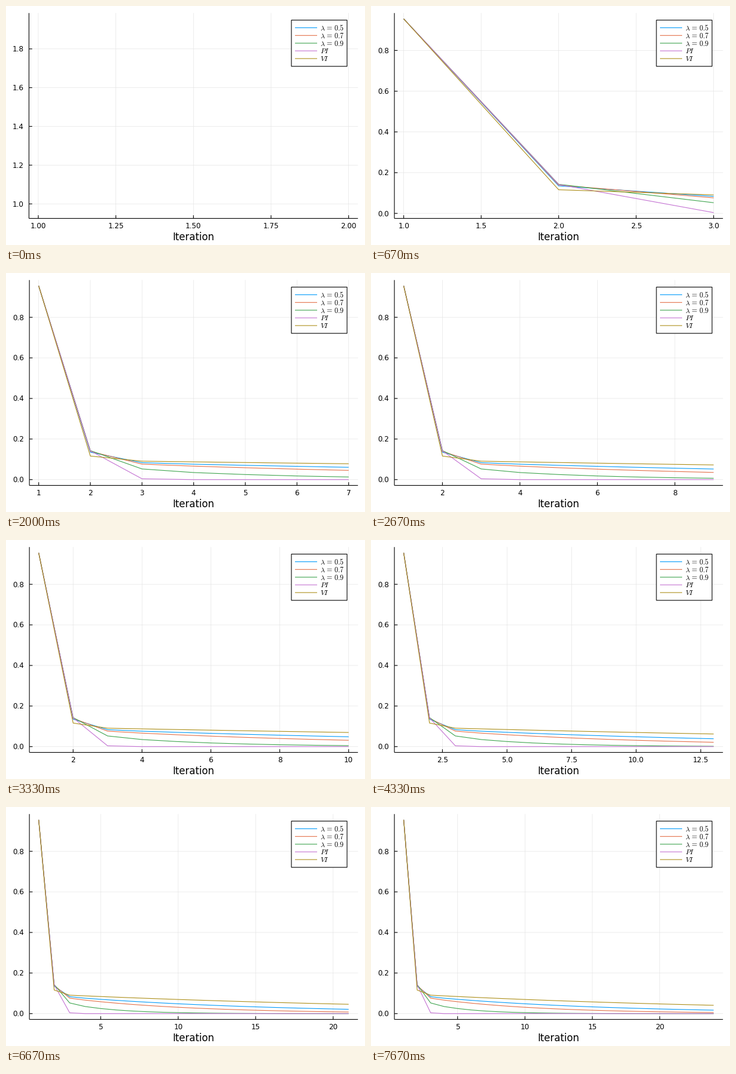
A matplotlib script that plays this animation: 600x400 px, repeating every 8000 ms.

```python
import math

import matplotlib.pyplot as plt
import numpy as np
from matplotlib.animation import FuncAnimation
from matplotlib.patches import Rectangle

W, H, DPI = 600, 400, 100
STEPS, LOOP_MS = 24, 8000
TOP, BOTTOM, RIGHT = 11.8, 355.5, 588.2
PAD = 0.03
PX = 72 / DPI  # points per pixel
TICK_SIZE, LABEL_SIZE, LEGEND_SIZE = 12 * PX, 16.5 * PX, 12 * PX
NICE = [(1, 1.0), (5, 0.9), (2.5, 0.5), (2, 0.7), (3, 0.2)]


def decay(head, rate):
    """Values for iterations 1..STEPS: given head, then exponential decay."""
    tail = head[-1] * np.exp(-rate * np.arange(1, STEPS - len(head) + 1))
    return np.concatenate([head, tail])


def lam(value):
    return rf"$\lambda\hspace{{0.12}}=\hspace{{0.12}}{value}$"


SERIES = [
    (lam(0.5), "#009afa", decay([0.955, 0.135, 0.0834, 0.0759], 0.0750)),
    (lam(0.7), "#e36f47", decay([0.955, 0.139, 0.0763, 0.0663], 0.1260)),
    (lam(0.9), "#3ea44e", decay([0.955, 0.143, 0.0525, 0.0348], 0.3320)),
    ("$PI$", "#c371d2", decay([0.955, 0.142, 0.0039, 0.0], 1.0)),
    ("$VI$", "#ac8e18", decay([0.955, 0.116, 0.0908], 0.0379)),
]

fig = plt.figure(figsize=(W / DPI, H / DPI), dpi=DPI, facecolor="white")
ax = fig.add_axes([0, 0, 1, 1])


def padded(lo, hi):
    if hi == lo:
        hi = lo + 1
    margin = PAD * (hi - lo)
    return lo - margin, hi + margin


def nice_ticks(lo, hi):
    """Pick 4 to 8 round ticks by count, coverage and roundness of the step."""
    best_score, best = -math.inf, None
    for power in (-1, 0, 1):
        for base, niceness in NICE:
            step = base * 10.0 ** power
            first, last = math.ceil(lo / step), math.floor(hi / step)
            count = last - first + 1
            if not 4 <= count <= 8:
                continue
            score = (0.25 * (1 - abs(count - 5) / 5) + 0.25 * niceness
                     + 0.5 * (hi - lo) / ((count - 1) * step))
            if score > best_score + 1e-9:
                best_score, best = score, (step, first, last)
    step, first, last = best
    digits = next(d for d in range(4) if abs(step - round(step, d)) < 1e-9)
    return [(i * step, f"{i * step:.{digits}f}") for i in range(first, last + 1)]


def line(xs, ys, color="black", width=1.1, z=2):
    ax.plot(xs, ys, color=color, lw=width * PX, zorder=z, snap=False,
            solid_capstyle="butt", solid_joinstyle="round")


def text(x, y, string, size, align="center"):
    ax.text(x, y, string, fontsize=size, ha=align, va="baseline", zorder=7)


def draw_legend():
    ax.add_patch(Rectangle((477, 23.6), 93, 77.4, fc="white", ec="black",
                           lw=1.1 * PX, zorder=5, snap=False))
    for row, (label, color, _) in enumerate(SERIES):
        y = 36.4 + 12.9 * row
        line([483, 520], [y, y], color, z=6)
        text(525, y + 4.2, label, LEGEND_SIZE, "left")


def draw(frame):
    n = frame + 1
    left = 38.4 if n == 1 else 39.1
    shown = [values[:n] for _, _, values in SERIES]
    x0, x1 = padded(1, n)
    y0, y1 = padded(np.min(shown), np.max(shown))

    def to_x(v):
        return left + (v - x0) / (x1 - x0) * (RIGHT - left)

    def to_y(v):
        return BOTTOM - (v - y0) / (y1 - y0) * (BOTTOM - TOP)

    ax.clear()
    ax.set(xlim=(0, W), ylim=(H, 0))
    ax.axis("off")

    for value, label in nice_ticks(x0, x1):
        x = to_x(value)
        line([x, x], [TOP, BOTTOM], "#e5e5e5", 0.7, 1)
        line([x, x], [BOTTOM, BOTTOM - 5.3])
        text(x, 371.8, label, TICK_SIZE)
    for value, label in nice_ticks(y0, y1):
        y = to_y(value)
        line([left, RIGHT], [y, y], "#e5e5e5", 0.7, 1)
        line([left, left + 5.3], [y, y])
        text(left - 8.8, y + 4.4, label, TICK_SIZE, "right")

    line([left, RIGHT], [BOTTOM, BOTTOM])
    line([left, left], [TOP, BOTTOM])
    text((left + RIGHT) / 2, 392.3, "Iteration", LABEL_SIZE)

    if n > 1:
        xs = to_x(np.arange(1, n + 1))
        for (_, color, _), values in zip(SERIES, shown):
            line(xs, to_y(values), color, z=3)
    draw_legend()
    return []


plt.rcParams["font.family"] = "DejaVu Sans"
plt.rcParams["mathtext.fontset"] = "cm"
anim = FuncAnimation(fig, draw, frames=STEPS, init_func=lambda: [],
                     interval=LOOP_MS / STEPS, repeat=True, repeat_delay=0)
plt.show()
```
